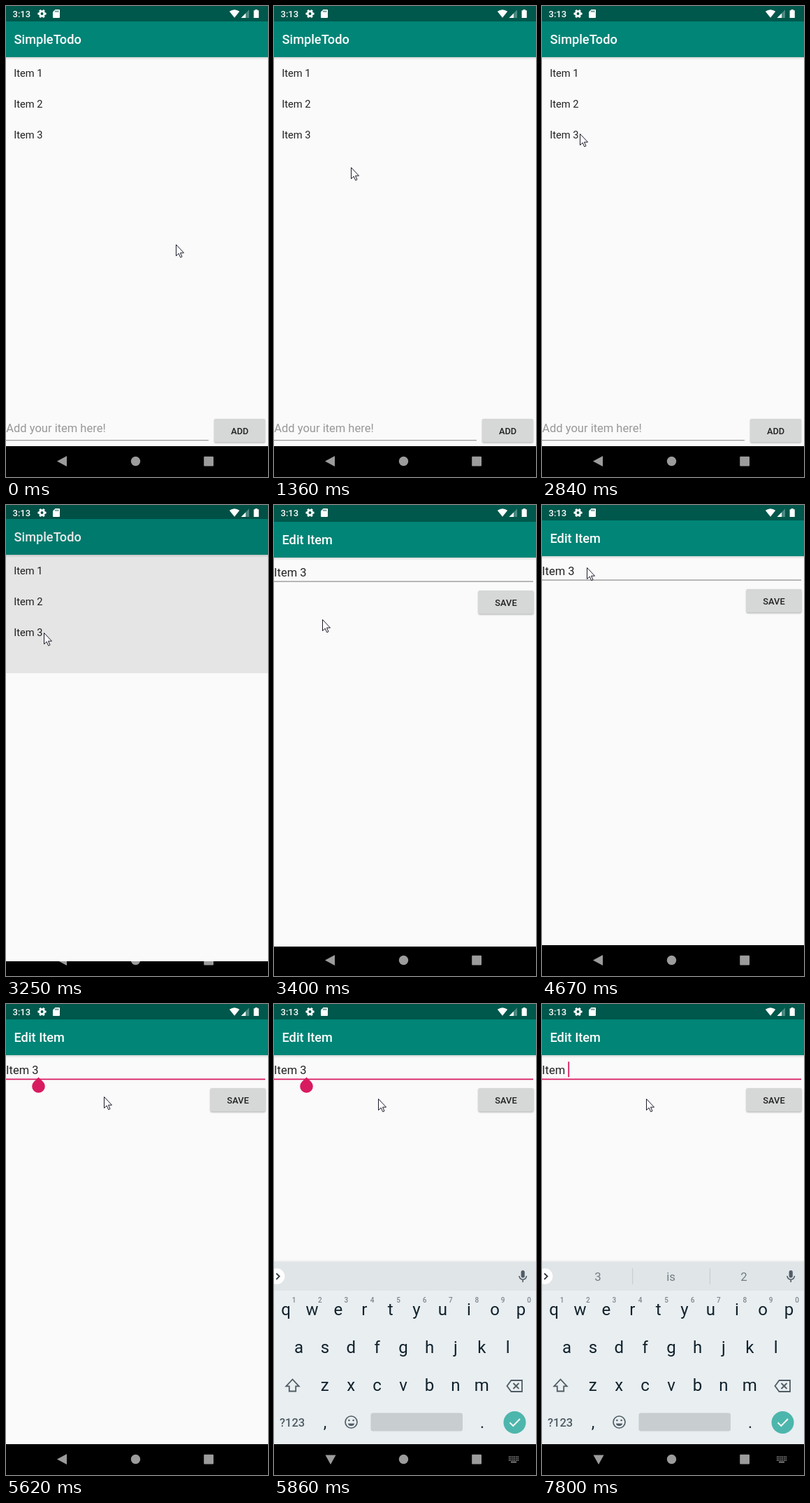
An HTML page with a canvas for the animation above (8000 ms loop, 375 by 672 pixels).

```html
<!DOCTYPE html>
<html lang="en">
<head>
<meta charset="utf-8">
<title>Todo list demo</title>
<style>
  html, body { margin: 0; width: 100%; height: 100%; overflow: hidden; background: #000; }
  canvas { display: block; width: 100vw; height: 100vh; }
</style>
</head>
<body>
<canvas id="stage"></canvas>
<script>
const W = 375, H = 672, LOOP = 8000;
const PINK = '#d81b60', PAPER = '#fafafa', KEY = '#10222c', ICON = '#4f5d65';
const canvas = document.getElementById('stage');
const ctx = canvas.getContext('2d');
const scale = window.devicePixelRatio || 1;
canvas.width = W * scale;
canvas.height = H * scale;

// Pointer moves: start time, ms per step, steps, destination x, y
const moves = [
  [280, 1, 1, 238, 330],
  [560, 135, 8, 67, 197],
  [1670, 150, 2, 54, 183],
  [2840, 1, 1, 54, 182],
  [3400, 150, 2, 83, 143],
  [3700, 135, 3, 76, 105],
  [4250, 164, 4, 60, 84],
  [5350, 135, 3, 140, 132],
  [5740, 120, 2, 149, 135]
];

function pointerAt(t) {
  let x = 243, y = 340;
  for (const [start, gap, steps, toX, toY] of moves) {
    if (t < start) break;
    const done = Math.min(steps, Math.floor((t - start) / gap) + 1) / steps;
    x += (toX - x) * done;
    y += (toY - y) * done;
  }
  return [Math.round(x), Math.round(y)];
}

function rect(x, y, w, h, color, radius = 0) {
  ctx.fillStyle = color;
  ctx.beginPath();
  ctx.roundRect(x, y, w, h, radius);
  ctx.fill();
}

function circle(x, y, r, color) {
  ctx.fillStyle = color;
  ctx.beginPath();
  ctx.arc(x, y, r, 0, 7);
  ctx.fill();
}

function fillPath(d, color) {
  ctx.fillStyle = color;
  ctx.fill(new Path2D(d), 'evenodd');
}

function strokePath(d, color, width) {
  ctx.strokeStyle = color;
  ctx.lineWidth = width;
  ctx.stroke(new Path2D(d));
}

function text(str, x, y, size, color, weight = 400, align = 'left') {
  ctx.font = `${weight} ${size}px Roboto, sans-serif`;
  ctx.textAlign = align;
  ctx.fillStyle = color;
  ctx.fillText(str, x, y);
}

function shade(y, h, from, to) {
  const g = ctx.createLinearGradient(0, y, 0, y + h);
  g.addColorStop(0, `rgba(0,0,0,${from})`);
  g.addColorStop(1, `rgba(0,0,0,${to})`);
  rect(0, y, W, h, g);
}

function shifted(dy, paint) {
  ctx.save();
  ctx.translate(0, dy);
  paint();
  ctx.restore();
}

function button(label, x, y, w) {
  ctx.save();
  ctx.shadowColor = 'rgba(0,0,0,.3)';
  ctx.shadowBlur = 2 * scale;
  ctx.shadowOffsetY = scale;
  rect(x, y, w, 33.5, '#d6d7d7', 2);
  ctx.restore();
  text(label, x + w / 2, y + 21.7, 12.8, '#212121', 500, 'center');
}

function statusIcons() {
  const white = '#fff';
  text('3:13', 9.5, 15.8, 13, white, 500);
  ctx.save();
  ctx.translate(51.5, 11);
  strokePath('M3.3 0A3.3 3.3 0 1 1-3.3 0A3.3 3.3 0 1 1 3.3 0', white, 2.7);
  for (let i = 0; i < 6; i++) {
    ctx.rotate(Math.PI / 3);
    rect(3.5, -1.5, 2.6, 3, white, .4);
  }
  ctx.restore();
  fillPath('M70.5 5H76Q77 5 77 6V16Q77 17 76 17H68Q67 17 67 16V8.5Z', white);
  for (let i = 0; i < 3; i++) rect(70.2 + i * 1.9, 6.5, 1, 2.3, '#00574b');
  fillPath('M327 16.8L319.8 7.8Q327 2.8 334.2 7.8Z', white);
  fillPath('M336.5 17L348 5.3V17Z', 'rgba(255,255,255,.3)');
  fillPath('M336.5 17L343 10.4V17Z', white);
  fillPath('M356.6 5H359.8V6.2H361.8V17H354.6V6.2H356.6Z', white);
}

function navBar(keyboardOpen) {
  const grey = '#9c9c9c';
  rect(0, 628, W, 44, '#000');
  fillPath(keyboardOpen ? 'M73.5 643.5H88.5L81 657Z' : 'M73 649.5L87 642V657Z', grey);
  circle(185.5, 649.5, 6.7, grey);
  rect(283.2, 642.7, 13.8, 13.8, grey, 1);
  if (!keyboardOpen) return;
  for (let row = 0; row < 3; row++)
    for (let col = 0; col < 6; col++) rect(336 + col * 2.5, 645.5 + row * 2.4, 1.5, 1.4, grey);
  rect(339, 652.8, 8, 1.5, grey);
}

function appWindow(title) {
  rect(0, 0, W, 22, '#00574b');
  rect(0, 22, W, 51, '#008577');
  rect(0, 73, W, 555, PAPER);
  shade(73, 4, .14, 0);
  text(title, 11.5, 54.4, 18.2, '#fff', 500);
}

function listScreen() {
  appWindow('SimpleTodo');
  for (let i = 0; i < 3; i++) text(`Item ${i + 1}`, 11.2, 101.3 + i * 44, 14.67, '#212121');
  text('Add your item here!', .3, 608.4, 16.5, '#989898');
  rect(0, 619, 290, 1.2, '#9a9a9a');
  button('ADD', 298, 589, 73);
}

function editScreen(t) {
  const focused = t >= 4906, erased = t >= 7800;
  const between = (a, b) => t >= a && t < b;
  appWindow('Edit Item');
  text(erased ? 'Item ' : 'Item 3', 0, 100, 16.5, '#212121');
  rect(0, focused ? 106.4 : 106.6, 371, focused ? 1.8 : 1.1, focused ? PINK : '#8f8f8f');
  button('SAVE', 292.5, 120, 79);
  if (t >= 5350 && !erased)
    fillPath('M46.5 104.5L53.1 110.9A9.3 9.3 0 1 1 39.9 110.9Z', PINK);
  if (erased) rect(37.3, 82.3, 1.8, 22, PINK);
  else if (between(5350, 5620) || between(6130, 6530) || between(7090, 7520))
    rect(46.6, 82.3, 1.8, 22, PINK);
}

function keyRow(letters, x, baseline) {
  [...letters].forEach((c, i) => text(c, x + i * 37.4, baseline, 24, KEY, 400, 'center'));
}

function keyboard(suggestions) {
  shade(365, 3, 0, .08);
  rect(0, 368, W, 41, '#e0e5e8');
  rect(0, 409, W, 219, '#e9eef1');

  circle(4, 388.5, 11.3, '#fff');
  strokePath('M3.3 384.3L7.7 388.6L3.3 392.9', '#263238', 1.8);
  rect(353.6, 380, 5.2, 10.5, ICON, 2.6);
  strokePath('M351 388A5.2 5.2 0 0 0 361.4 388M356.2 393V397', ICON, 1.6);
  suggestions.forEach((word, i) => {
    text(word, 80 + i * 104.5, 395, 16.8, '#727d83', 400, 'center');
    if (i) rect(18.5 + i * 110.7, 377, 1, 23, '#c3cacd');
  });

  keyRow('qwertyuiop', 17, 444);
  keyRow('asdfghjkl', 35.5, 498);
  keyRow('zxcvbnm', 72.8, 552);
  for (let i = 0; i < 10; i++)
    text((i + 1) % 10, 28.5 + i * 37.4, 425.6, 10, '#7c878d', 500, 'center');

  strokePath('M26.5 535.5L17.3 545.3H21.8V552.5H31.2V545.3H35.7Z', ICON, 1.8);
  strokePath('M339.5 537H355V553H339.5L333.5 545Z', ICON, 1.8);
  strokePath('M342.5 541L350.5 549M350.5 541L342.5 549', ICON, 1.8);

  text('?123', 8, 603, 16.5, ICON, 500);
  text(',', 73, 605, 23, KEY, 400, 'center');
  text('.', 298, 605, 23, KEY, 400, 'center');
  strokePath('M119 596.5A8.5 8.5 0 1 1 102 596.5A8.5 8.5 0 1 1 119 596.5', ICON, 1.7);
  circle(107.4, 594, 1.3, ICON);
  circle(113.6, 594, 1.3, ICON);
  fillPath('M105.7 598.5H115.3A5 5 0 0 1 105.7 598.5Z', ICON);
  rect(138.5, 583.5, 131.5, 26, '#c8cdd0', 3);
  circle(344.5, 597, 16, '#4db6ac');
  strokePath('M337.5 597.3L342.3 602L352 592', '#fff', 1.9);
}

function pointer(x, y) {
  ctx.save();
  ctx.translate(x + .5, y + .5);
  const arrow = 'M0 0V16L3.7 12.6L6.2 18.2L8.5 17.2L6 11.7H11Z';
  fillPath(arrow, '#fff');
  strokePath(arrow, '#1b1b2b', 1);
  ctx.restore();
}

function draw(t) {
  ctx.setTransform(scale, 0, 0, scale, 0, 0);
  const keyboardOpen = t >= 5740;
  rect(0, 0, W, 22, '#00574b');
  if (t < 3250) {
    listScreen();
    navBar(false);
  } else if (t < 3400) {
    // Old screen dims and rises while the new window is revealed from below
    navBar(false);
    shifted(-2, listScreen);
    rect(0, 0, W, 240, 'rgba(0,0,0,.084)');
    rect(0, 240, W, 411, PAPER);
  } else {
    navBar(keyboardOpen);
    shifted(t < 3550 ? 2 : 0, () => editScreen(t));
  }
  if (keyboardOpen) {
    ctx.save();
    ctx.beginPath();
    ctx.rect(0, 0, W, 628);
    ctx.clip();
    shifted(t < 5860 ? 60 : 0, () => keyboard(t >= 7800 ? ['3', 'is', '2'] : []));
    ctx.restore();
  }
  statusIcons();
  pointer(...pointerAt(t));
}

const begin = performance.now();
function tick() {
  draw((performance.now() - begin) % LOOP);
  requestAnimationFrame(tick);
}
tick();
</script>
</body>
</html>
```
